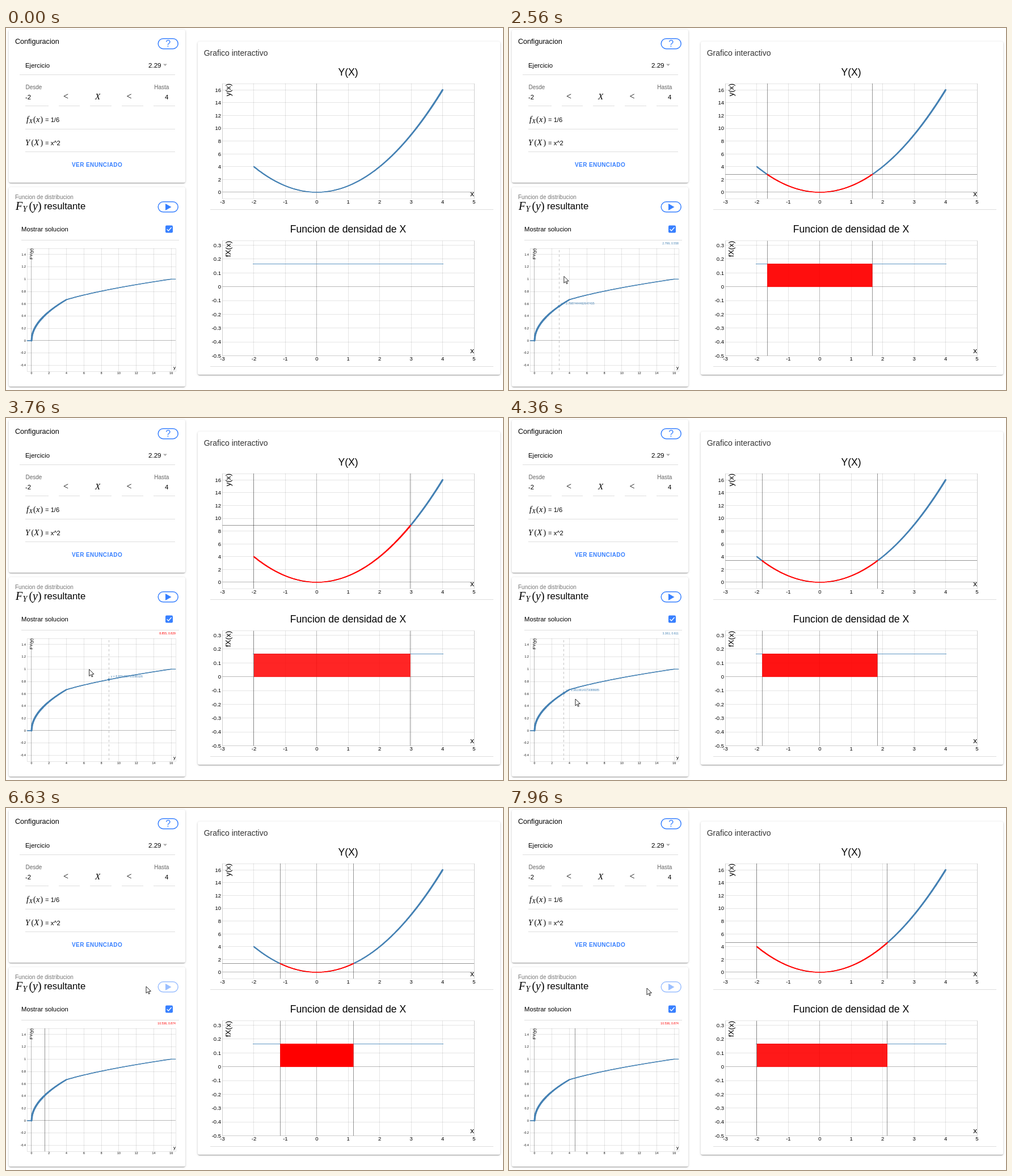
Recreate the animation shown at these times as an HTML page with a canvas. Size 876x639 px, loop 8000 ms.

```html
<!DOCTYPE html>
<html lang="es">
<head>
<meta charset="utf-8">
<title>Funcion de distribucion</title>
<style>
html, body { margin: 0; width: 100%; height: 100%; overflow: hidden; background: #fff; }
.card {
  position: absolute; background: #fff; border-radius: 3px;
  box-shadow: 0 2px 1px -1px rgba(0,0,0,.2), 0 1px 2px rgba(0,0,0,.16), 0 1px 4px rgba(0,0,0,.14);
}
canvas { position: absolute; left: 0; top: 0; }
</style>
</head>
<body>
<div class="card" style="left:5px;top:3px;width:311px;height:270px"></div>
<div class="card" style="left:5px;top:281px;width:311px;height:352px"></div>
<div class="card" style="left:338px;top:24px;width:533px;height:588px"></div>
<canvas id="stage" width="876" height="639"></canvas>
<script>
const ctx = document.getElementById('stage').getContext('2d');
const SANS = '"Liberation Sans", Arial, sans-serif';
const SERIF = '"Liberation Serif", "Times New Roman", serif';
const BLUE = 'steelblue', ACCENT = '#3880ff', RED = 'red';
const LOOP = 8000, START = 500, STEP = 200 / 3, PLAY = 82;

// Pointer path: step, x, y
const pointer = [
  [0, 9, 355], [4, 70, 328], [8, 120, 345], [12, 68, 369], [14, 32, 404],
  [17, 92, 432], [20, 80.55, 438], [21, 78, 439], [25, 72, 441], [29, 80, 440],
  [39, 178.99, 430], [40, 190, 428], [45, 262, 425], [50, 120, 450], [54, 79, 482],
  [57, 96.72, 495], [58, 117, 496], [63, 194, 425], [65, 208, 395], [67, 211, 378],
  [69, 211, 377], [70, 209.23, 376], [71, 211, 373], [72, 207.12, 374], [73, 210, 366],
  [76, 240, 335], [79, 280, 313], [81, 283, 314], [86, 262, 316], [92, 247, 315], [112, 243, 318]
];
// Sweep after pressing play: step, line x, value
const sweep = [[82, 39, -0.4], [92, 68.2, 1.36], [112, 116, 4.617]];

const yPlot = {
  x: 381.5, y: 98, w: 443.5, h: 203.2, dx: [-3, 5], dy: [-1, 17], sx: 1, sy: 2,
  size: 9.5, gap: 8.5, labels: ['x', 'y(x)'], labelSize: 13.5
};
const fPlot = {
  x: 381.5, y: 375.7, w: 443.5, h: 202.8, dx: [-3, 5], dy: [-0.5, 0.332], sx: 1, sy: 0.1,
  size: 9.5, gap: 8.5, labels: ['x', 'fX(x)'], labelSize: 13.5
};
const cdfPlot = {
  x: 37.3, y: 389, w: 261.6, h: 217.2, dx: [-0.5, 16.5], dy: [-0.5, 1.5], sx: 2, sy: 0.2,
  size: 5.2, gap: 8, labels: ['y', 'FY(y)'], labelSize: 8
};

const px = (p, v) => p.x + (v - p.dx[0]) / (p.dx[1] - p.dx[0]) * p.w;
const py = (p, v) => p.y + (p.dy[1] - v) / (p.dy[1] - p.dy[0]) * p.h;
const clamp = (v, a, b) => Math.max(a, Math.min(b, v));

function cdf(y) {
  if (y <= 0) return 0;
  if (y < 4) return Math.sqrt(y) / 3;
  return y < 16 ? (Math.sqrt(y) + 2) / 6 : 1;
}

// Cubic interpolation through keyed rows
function sample(keys, t) {
  const last = keys.length - 1;
  let i = 0;
  while (i < last - 1 && t >= keys[i + 1][0]) i++;
  const a = keys[i], b = keys[i + 1], d = b[0] - a[0], u = clamp((t - a[0]) / d, 0, 1);
  const before = keys[Math.max(0, i - 1)], after = keys[Math.min(last, i + 2)];
  return [1, 2].map(c => {
    const m = (b[c] - before[c]) / (b[0] - before[0]) * d;
    const n = (after[c] - a[c]) / (after[0] - a[0]) * d;
    const v = u * u * (3 - 2 * u);
    return a[c] * (1 - v) + b[c] * v + m * u * (1 - u) * (1 - u) - n * u * u * (1 - u);
  });
}

function text(s, x, y, size, opt = {}) {
  ctx.font = `${opt.style || ''} ${size}px ${opt.font || SANS}`;
  ctx.fillStyle = opt.color || '#000';
  ctx.textAlign = opt.align || 'left';
  ctx.textBaseline = opt.base || 'alphabetic';
  ctx.letterSpacing = opt.spacing || '0px';
  ctx.fillText(s, x, y);
}

function line(x1, y1, x2, y2, color, width = 1) {
  ctx.strokeStyle = color;
  ctx.lineWidth = width;
  ctx.beginPath();
  ctx.moveTo(x1, y1);
  ctx.lineTo(x2, y2);
  ctx.stroke();
}
const snap = v => Math.floor(v) + 0.5;
const vline = (p, x, color) => line(snap(x), p.y, snap(x), p.y + p.h, color);
const hline = (p, y, color) => line(p.x, snap(y), p.x + p.w, snap(y), color);
const rule = (x1, x2, y, color = '#dedede') => line(x1, y, x2, y, color);

function poly(points, fill) {
  ctx.beginPath();
  points.forEach(q => ctx.lineTo(q[0], q[1]));
  ctx.closePath();
  ctx.fillStyle = fill;
  ctx.fill();
}

// Letters of a formula: [text, x, baseline, size, upright]
function formula(parts) {
  parts.forEach(([s, x, y, size, upright]) =>
    text(s, x, y, size, { font: SERIF, style: upright ? '' : 'italic' }));
}

function axes(p) {
  const light = 'rgba(0,0,0,.1)', dark = 'rgba(0,0,0,.28)';
  ctx.strokeStyle = light;
  ctx.lineWidth = 1;
  ctx.strokeRect(snap(p.x), snap(p.y), Math.round(p.w), Math.round(p.h));
  for (let i = Math.ceil(p.dx[0] / p.sx); i * p.sx <= p.dx[1]; i++) {
    const x = px(p, i * p.sx);
    vline(p, x, i ? light : dark);
    text(String(i * p.sx), x, p.y + p.h + p.size * 0.91, p.size, { align: 'center' });
  }
  for (let i = Math.ceil(p.dy[0] / p.sy); i * p.sy <= p.dy[1]; i++) {
    const y = py(p, i * p.sy);
    hline(p, y, i ? light : dark);
    text(String(+(i * p.sy).toFixed(1)), p.x - 2.5, y + p.size * 0.35, p.size, { align: 'right' });
  }
  const s = p.labelSize;
  text(p.labels[0], p.x + p.w, p.y + p.h - s * 0.32 - (s < 10 ? 2 : 0), s, { align: 'right' });
  ctx.save();
  ctx.translate(p.x + s * 1.1 + (s < 10 ? 1 : 0), p.y);
  ctx.rotate(-Math.PI / 2);
  text(p.labels[1], 0, 0, s, { align: 'right' });
  ctx.restore();
}

// Steeper stretches are drawn heavier
function curve(p, f, from, to, color, base, gain, cap) {
  const n = Math.max(1, Math.ceil((to - from) / (p.dx[1] - p.dx[0]) * p.w));
  let x = px(p, from), y = py(p, f(from));
  ctx.lineCap = 'round';
  for (let i = 1; i <= n; i++) {
    const v = from + (to - from) * i / n, x2 = px(p, v), y2 = py(p, f(v));
    line(x, y, x2, y2, color, Math.min(cap, base + gain * Math.abs((y2 - y) / (x2 - x))));
    x = x2;
    y = y2;
  }
  ctx.lineCap = 'butt';
}

function pill(x, y) {
  ctx.strokeStyle = ACCENT;
  ctx.lineWidth = 1.5;
  ctx.beginPath();
  ctx.roundRect(x, y, 35, 18, 9);
  ctx.stroke();
}

function panels(playing) {
  text('Configuracion', 16, 27.5, 12.6);
  pill(268.2, 18.7);
  text('?', 285.7, 33.4, 16, { color: ACCENT, align: 'center' });
  text('Ejercicio', 34, 69.5, 11.4);
  text('2.29', 251, 69.5, 11.6);
  poly([[277, 63.5], [284, 63.5], [280.5, 67]], '#aaa');
  rule(24, 298, 82.5);
  text('Desde', 34.5, 108.3, 10, { color: '#666' });
  text('Hasta', 261.3, 108.3, 10, { color: '#666' });
  text('-2', 34, 125.7, 11.4);
  text('4', 280, 125.7, 11.4);
  formula([['<', 101, 126, 16, 1], ['X', 157, 125.5, 15], ['<', 212.5, 126, 16, 1]]);
  [[34, 75], [93, 130], [148, 186], [204, 242], [260, 298]].forEach(([a, b]) => rule(a, b, 137.5));
  formula([['f', 36, 166, 15], ['X', 40.5, 168, 10.5], ['(', 48, 166, 14, 1], ['x', 53, 166, 14.5], [')', 60.5, 166, 14, 1]]);
  text('= 1/6', 69, 165.7, 11.2);
  rule(34, 298, 178.5);
  formula([['Y', 34, 207, 14.5], ['(', 44.5, 207, 14, 1], ['X', 49.5, 207, 14.5], [')', 60.5, 207, 14, 1]]);
  text('= x^2', 69, 206.5, 11.2);
  rule(34, 298, 218.5);
  text('VER ENUNCIADO', 116, 244.6, 10, { color: ACCENT, style: 'bold', spacing: '0.4px' });

  text('Funcion de distribucion', 16, 301.5, 10, { color: '#777' });
  formula([['F', 17, 320.5, 20], ['Y', 29.5, 324, 14], ['(', 40.5, 320.5, 20, 1], ['y', 47, 320.5, 20], [')', 56, 320.5, 20, 1]]);
  text('resultante', 67, 320, 16.7);
  ctx.globalAlpha = playing ? 0.5 : 1;
  pill(268.2, 306.8);
  poly([[281, 310], [291.5, 316], [281, 322]], ACCENT);
  ctx.globalAlpha = 1;
  text('Mostrar solucion', 27, 359.2, 11.3);
  ctx.fillStyle = ACCENT;
  ctx.beginPath();
  ctx.roundRect(281, 348.5, 13, 13, 2);
  ctx.fill();
  ctx.strokeStyle = '#fff';
  ctx.lineWidth = 1.3;
  ctx.beginPath();
  ctx.moveTo(283.6, 355.2);
  ctx.lineTo(286.3, 358);
  ctx.lineTo(291.6, 352);
  ctx.stroke();
  rule(27, 305, 374.5);

  text('Grafico interactivo', 348.7, 49, 14, { color: '#333' });
  text('Y(X)', 603, 83.5, 17.6, { align: 'center' });
  text('Funcion de densidad de X', 603, 361, 17.6, { align: 'center' });
  rule(360, 859, 320.5);
  rule(360, 859, 597.5);
}

function inChart(k) {
  if (k < 0) return false;
  return sample(pointer, k)[1] >= 373;
}
const valueAt = k => {
  const x = clamp(sample(pointer, k)[0], cdfPlot.x, cdfPlot.x + cdfPlot.w);
  return cdfPlot.dx[0] + (x - cdfPlot.x) / cdfPlot.w * 17;
};

function results(value) {
  const guide = 'rgba(0,0,0,.42)', has = value !== null, square = x => x * x;
  const inside = has && value > 0;
  const hi = inside ? Math.min(4, Math.sqrt(value)) : -2;
  const lo = inside ? Math.max(-2, -hi) : -2;
  if (has) hline(yPlot, py(yPlot, value), guide);
  if (inside) {
    [yPlot, fPlot].forEach(p => [lo, hi].forEach(v => vline(p, px(p, v), guide)));
  }
  const part = (a, b, c) => { if (b > a) curve(yPlot, square, a, b, c, 1.4, 1, 3.2); };
  if (lo > -2) part(-2, lo, BLUE);
  part(hi, 4, BLUE);
  if (inside) part(lo, hi, RED);

  const top = py(fPlot, 1 / 6), x1 = px(fPlot, lo), x2 = px(fPlot, hi);
  line(435, snap(top), 771, snap(top), '#5f97c4');
  if (inside) {
    ctx.globalAlpha = Math.min(1, 1 - (x2 - x1 - 130) * 0.001);
    ctx.fillStyle = RED;
    ctx.fillRect(x1, top, x2 - x1, py(fPlot, 0) - top + 0.5);
    ctx.globalAlpha = 1;
  }
}

function tip(value) {
  const x = px(cdfPlot, value), y = py(cdfPlot, cdf(value));
  ctx.setLineDash([4, 4]);
  line(snap(x), cdfPlot.y + 3, snap(x), cdfPlot.y + cdfPlot.h, '#c4c4c4');
  ctx.setLineDash([]);
  ctx.fillStyle = BLUE;
  ctx.beginPath();
  ctx.arc(x, y, 2.1, 0, 7);
  ctx.fill();
  text('y = ' + value, x + 3.5, y - 3.5, 5.2, { color: BLUE });
}

function arrow(x, y) {
  const shape = [[0, 0], [0, 17], [4, 13.3], [6.6, 19], [9, 18], [6.6, 12.2], [12, 12]];
  poly(shape.map(([a, b]) => [x + a * 0.7, y + b * 0.7]), '#fff');
  ctx.strokeStyle = '#111';
  ctx.lineWidth = 0.9;
  ctx.stroke();
}

function draw(k) {
  const playing = k >= PLAY, run = playing ? sample(sweep, k) : null;
  let seen = k - 1;
  while (seen >= 0 && !inChart(seen)) seen--;
  const hovered = seen >= 0 ? valueAt(seen) : null;

  ctx.clearRect(0, 0, 876, 639);
  panels(playing);
  [yPlot, fPlot, cdfPlot].forEach(axes);
  results(playing ? run[1] : hovered);

  if (playing) vline(cdfPlot, run[0], 'rgba(0,0,0,.42)');
  curve(cdfPlot, cdf, -0.5, 0, BLUE, 1.4, 0, 1.4);
  curve(cdfPlot, cdf, 0, 4, BLUE, 1.1, 2, 3.2);
  curve(cdfPlot, cdf, 4, 16.5, BLUE, 1.1, 1.6, 3.2);
  if (hovered !== null) {
    text(`${hovered.toFixed(3)}, ${cdf(hovered).toFixed(3)}`, 299, 381.8, 5.2,
      { align: 'right', color: hovered < 4 ? BLUE : RED });
    if (inChart(k - 1)) tip(hovered);
  }
  if (k >= 0) arrow(...sample(pointer, k));
}

let shown = null;
function tick(now) {
  const t = now % LOOP;
  const k = Math.max(-1, Math.floor((t - START + 7) / STEP));
  if (k !== shown) draw(shown = k);
  requestAnimationFrame(tick);
}
draw(shown = -1);
requestAnimationFrame(tick);
</script>
</body>
</html>
```
